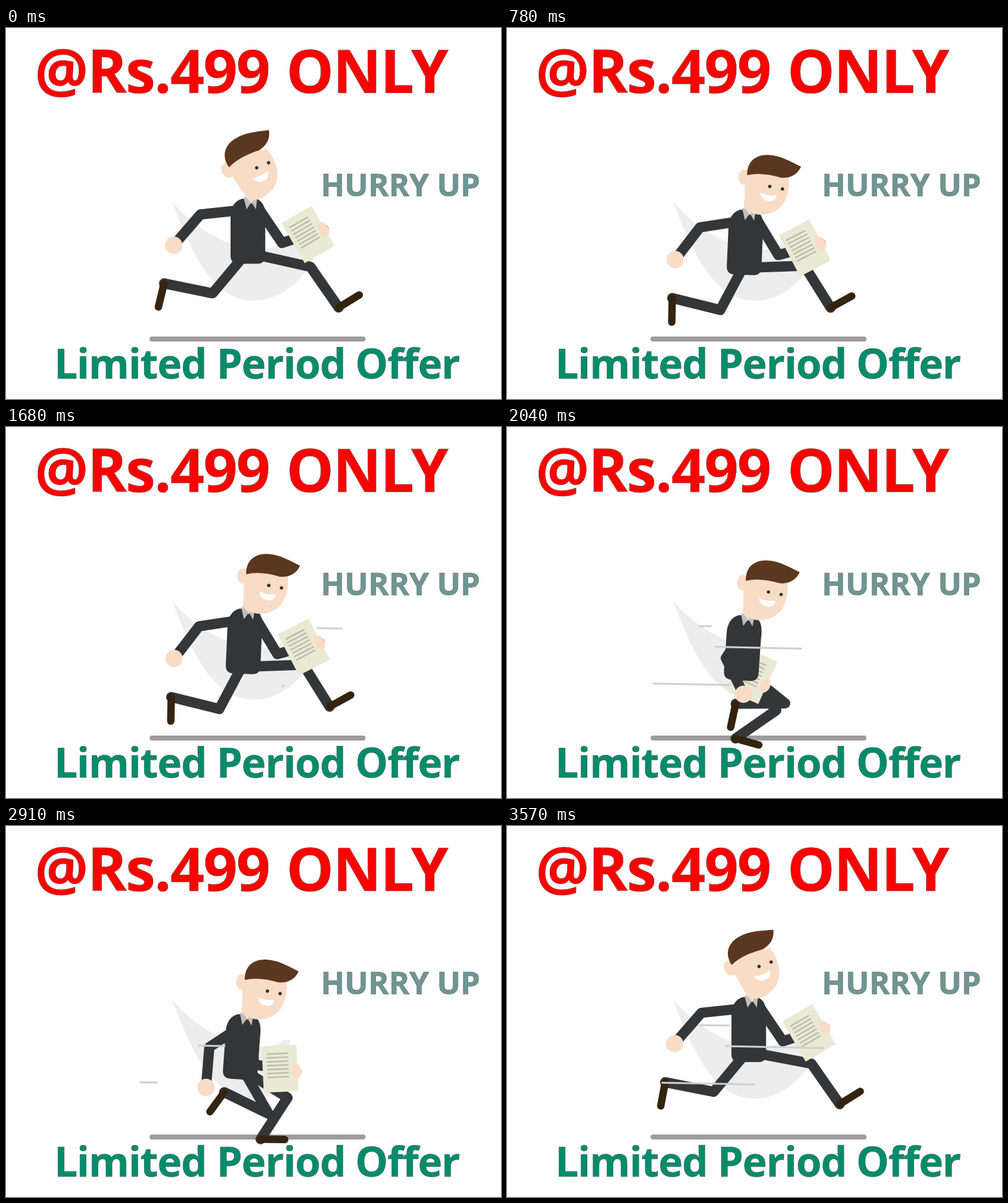
Write an HTML page that moves like this. It is 800 px wide and 600 px high and loops after 3.6 s.

```html
<!DOCTYPE html>
<html lang="en">
<head>
<meta charset="utf-8">
<title>Limited Period Offer</title>
<style>
  html, body { margin: 0; width: 100%; height: 100%; overflow: hidden; background: #fefefe; }
  svg { display: block; width: 800px; height: 600px; }
  text { font-family: "Open Sans", "Noto Sans", sans-serif; font-weight: 700; text-anchor: middle; stroke: #666; stroke-width: .6; }
  .suit { fill: none; stroke: #353638; stroke-width: 16.5; stroke-linecap: round; stroke-linejoin: round; }
  .shoe { fill: none; stroke: #33230f; stroke-width: 12; stroke-linecap: round; }
  .skin { fill: #f9dcc6; }
  .speed { stroke: #d0d0d0; stroke-width: 3; stroke-linecap: round; }
</style>
</head>
<body>
<svg viewBox="0 0 800 600">
  <defs><clipPath id="cut"><rect id="cutBox" x="0" y="260" width="500" height="200"/></clipPath></defs>
  <rect width="800" height="600" fill="#fefefe"/>

  <text x="380" y="105" font-size="96.5" letter-spacing="-1.7" word-spacing="4" fill="#f00">@Rs.499 ONLY</text>
  <text x="637.5" y="272" font-size="50.4" fill="#6d9694">HURRY UP</text>
  <text x="405.5" y="567" font-size="66.5" letter-spacing="-1.1" fill="#028c6c">Limited Period Offer</text>

  <path clip-path="url(#cut)" fill="#ededee"
    d="M268 280C295 350 330 441 400 441C450 441 490 400 510 345L448 346C415 378 320 345 268 280Z"/>
  <path d="M236 503H577" stroke="#9d9b9c" stroke-width="8" stroke-linecap="round"/>

  <path id="legB" class="suit"/><path id="shoeB" class="shoe"/>
  <path id="legA" class="suit"/><path id="shoeA" class="shoe"/>

  <path id="armP" class="suit"/>
  <g id="paper">
    <rect x="-54" y="-43" width="56" height="75" fill="#e8ead3"/>
    <path id="script" stroke="#bdbdb0" stroke-width="2.6"/>
    <ellipse class="skin" rx="8" ry="12"/>
  </g>
  <path id="armF" class="suit"/><circle id="hand" class="skin" r="14"/>

  <g id="torso">
    <path fill="#343537" d="M-10 0L14 0C28 6 29 20 28 38V92Q28 105 15 105H-15Q-28 105 -28 92V30C-28 14 -22 4 -10 0Z"/>
    <path class="skin" d="M-5 -14H15L14 2L5 8L-4 2Z"/>
    <path fill="#bfbfbf" d="M-7 -2L-2 17L5 6L-4 -3ZM15 -2L13 17L6 6L13 -3Z"/>
  </g>

  <g id="head">
    <path class="skin" d="M386 227L456 235C459 262 450 287 428 295C410 300 400 298 388 290Q384 280 385 262Z"/>
    <g id="hair">
      <ellipse class="skin" cx="385" cy="237" rx="9.5" ry="12.5"/>
      <path class="skin" d="M390 228H450V255H386Z"/>
      <path fill="#5b3720" d="M390 234C389 212 404 200 424 201C445 202 460 212 477 220C471 233 460 239 445 238C424 232 406 230 390 234Z"/>
    </g>
    <circle cx="425.5" cy="252" r="2.7" fill="#333"/><circle cx="446" cy="256" r="2.7" fill="#333"/>
    <path fill="#fff" d="M410 262Q424 268 437 266Q435 277 424 276Q412 274 410 262Z"/>
  </g>

  <g id="lines"></g>
</svg>
<script>
const LOOP = 3600, STEP = 30, STRIDE = 900, HALF = STRIDE / 2, SWISH = 780;
const THIGH = 78, SHIN = 80, FOOT = 39;
const $ = id => document.getElementById(id);
const set = (id, name, value) => $(id).setAttribute(name, value);
const place = (x, y, turn) => `translate(${x} ${y}) rotate(${turn})`;
const poly = pts => "M" + pts.map(p => p[0].toFixed(2) + " " + p[1].toFixed(2)).join("L");
const ease = u => Math.sin(Math.PI / 2 * Math.min(1, Math.max(0, u))) ** 2;
const wave = (t, span) => Math.cos(2 * Math.PI * t / span);

// Bones from a start point: pairs of angle in degrees and length.
function chain(x, y, ...bones) {
  const pts = [[x, y]];
  for (let i = 0; i < bones.length; i += 2) {
    const a = bones[i] * Math.PI / 180;
    x += bones[i + 1] * Math.cos(a);
    y += bones[i + 1] * Math.sin(a);
    pts.push([x, y]);
  }
  return pts;
}

// One stride of a leg: time, then angles of thigh, shin and foot.
const gait = [
  [-15, 12, 55, -32],   // reach
  [150, 17, 78, -2],    // land
  [210, 32, 123, 1],    // carry
  [330, 118, 194, 91],  // push off
  [435, 130, 191, 102], // trail
  [600, 118, 213, 119], // fold
  [660, 60, 206, 126],  // pass
  [780, -2, 58, -29]    // lift
];

// Smooth periodic curve through the keys of one column, without overshoot.
function curve(col) {
  const n = gait.length, time = i => gait[i][0], val = i => gait[i % n][col];
  const gap = i => (i === n - 1 ? time(0) + STRIDE : time(i + 1)) - time(i);
  const slope = i => (val(i + 1) - val(i)) / gap(i);
  const tan = gait.map((_, i) => {
    const a = slope((i + n - 1) % n), b = slope(i);
    return a * b <= 0 ? 0 : 2 * a * b / (a + b);
  });
  return t => {
    let i = n - 1;
    while (time(i) > t) i--;
    const h = gap(i), u = (t - time(i)) / h, w = 1 - u;
    return val(i) * (1 + 2 * u) * w * w + val(i + 1) * u * u * (3 - 2 * u)
      + h * u * w * (tan[i] * w - tan[(i + 1) % n] * u);
  };
}
const [thigh, shin, foot] = [1, 2, 3].map(curve);

// Arm ends: shoulder x, y; upper angle, length; forearm angle, length.
const paperArm = { front: [17, 15, 56, 68, -18, 71], back: [-14, 15, 188, 58, 107, 62] };
const freeArm = { front: [18, 27, 65, 50, -14, 64], back: [-17, 19, 174, 60, 131, 66] };

function bodyAt(t) {
  const u = t % HALF;
  const lift = ((1 + wave(t + 10, HALF)) / 2) ** 1.5;
  const nod = ease((u - 105) / 98) - ease((u - 330) / 111);
  return { x: 385 + 6 * lift, y: 305 - 29 * lift, lean: 4 * (1 - lift), tilt: 34 * (nod - 1) };
}

function drawLeg(name, t, body) {
  const p = (t + 15) % STRIDE - 15;
  const pts = chain(body.x - 1.7 * body.lean + 9 + 16 * wave(p, STRIDE), body.y + 93,
    thigh(p), THIGH, shin(p), SHIN, foot(p), FOOT);
  set("leg" + name, "d", poly(pts.slice(0, 3)));
  set("shoe" + name, "d", poly(pts.slice(2)));
}

function drawArm(name, arm, t, body) {
  const p = t % STRIDE;
  const back = ease((p - 147) / 203) - ease((p - 590) / 210);
  const v = arm.front.map((a, i) => a + (arm.back[i] - a) * back);
  const pts = chain(body.x + v[0], body.y + v[1], ...v.slice(2));
  set("arm" + name, "d", poly(pts));
  return { x: pts[2][0], y: pts[2][1], turn: v[4] };
}

let script = "";
for (let i = 0; i < 7; i++) script += `M-47 ${-30 + i * 6.3}h35`;
set("script", "d", script);

// Speed lines: start, end, delay.
const speed = [[543,326, 311,322, -10], [543,360, 311,355, 105], [449,419, 217,414.5, 90]].map(s => {
  const el = document.createElementNS("http://www.w3.org/2000/svg", "line");
  el.setAttribute("class", "speed");
  $("lines").append(el);
  return { el, s };
});

function drawSpeed(t) {
  for (const { el, s: [x1, y1, x2, y2, delay] } of speed) {
    const u = t % SWISH - delay;
    const head = ease(u / 480), tail = ease((u - 283) / 253);
    [head, tail].forEach((k, i) => {
      el.setAttribute("x" + (i + 1), x1 + (x2 - x1) * k);
      el.setAttribute("y" + (i + 1), y1 + (y2 - y1) * k);
    });
    el.setAttribute("visibility", head - tail > 0.004 ? "visible" : "hidden");
  }
}

function draw(t) {
  const body = bodyAt(t);
  drawLeg("A", t, body);
  drawLeg("B", t + HALF, body);

  const sheet = drawArm("P", paperArm, t, body);
  set("paper", "transform", place(sheet.x, sheet.y, sheet.turn - 12));
  set("cutBox", "width", Math.max(300, sheet.x - 10));

  const hand = drawArm("F", freeArm, t + HALF, body);
  set("hand", "cx", hand.x);
  set("hand", "cy", hand.y);

  set("torso", "transform", place(body.x, body.y, body.lean));
  set("head", "transform", place(body.x + 6, body.y - 6, body.tilt) + " translate(-394 -284)");
  set("hair", "transform", `translate(-1 ${body.tilt * 0.22})`);
  drawSpeed(t);
}

const start = performance.now();
function tick() {
  const t = Math.max(0, performance.now() - start) % LOOP;
  draw(Math.floor(t / STEP) * STEP);
  requestAnimationFrame(tick);
}
tick();
</script>
</body>
</html>
```
